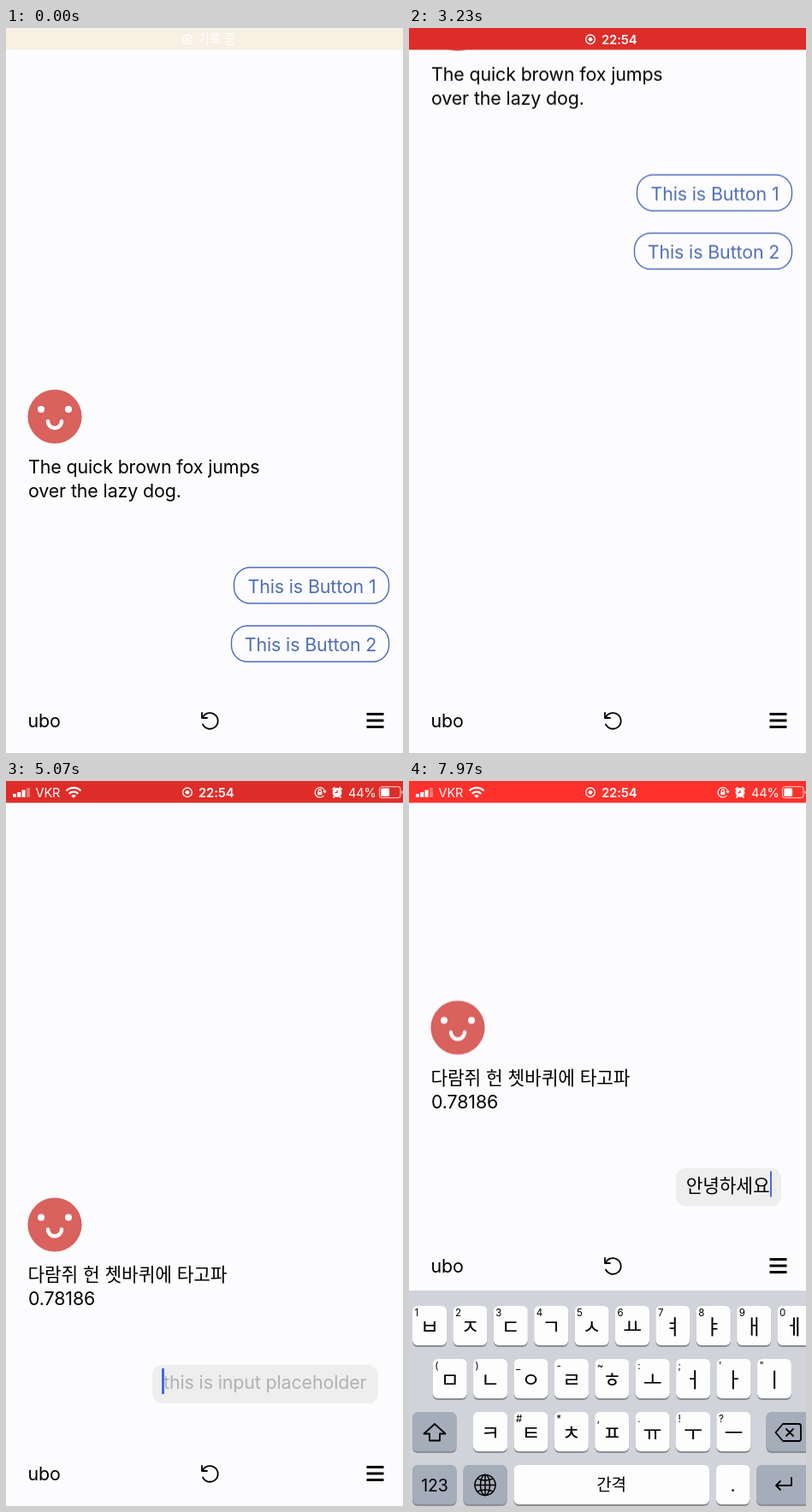
An HTML page that plays this animation: 464 px wide and 848 px high, repeating every 8 s.

```html
<!DOCTYPE html>
<html lang="ko">
<head>
<meta charset="utf-8">
<title>Chat prompt</title>
<style>
html, body { margin: 0; width: 100%; height: 100%; overflow: hidden; background: #fcfcfe; }
svg { display: block; width: 100%; height: 100%; }
svg, #field { font: 21.4px Inter, "Noto Sans CJK KR", "Noto Sans CJK", sans-serif; letter-spacing: -.12px; }
.line { fill: none; stroke: #000; stroke-linecap: round; stroke-linejoin: round; }
.mid { text-anchor: middle; }
.button rect { fill: none; stroke: #4b6cb7; stroke-width: 1.4; }
.button text { fill: #4f6eb5; text-anchor: middle; }

.old, .new, .tools, .keys, .entry, .bar, .label, .clock, .icons { animation: 8s linear infinite; }
.old { animation-name: old; }
.new { animation-name: new; }
.tools { animation-name: tools; }
.keys { animation-name: keys; }
.entry { animation-name: entry; }
.bar { animation-name: bar; }
.label { animation-name: label; animation-timing-function: step-end; }
.clock { animation-name: clock; animation-timing-function: step-end; }
.icons { animation-name: icons; }

@keyframes old {
  0% { transform: translateY(0); }
  37.4% { transform: translateY(0); animation-timing-function: ease-in-out; }
  42.9%, 100% { transform: translateY(-800px); }
}
@keyframes new {
  0% { transform: translateY(800px); }
  37.4% { transform: translateY(800px); animation-timing-function: ease-in-out; }
  42.9% { transform: translateY(0); }
  53.75% { transform: translateY(0); animation-timing-function: ease-in-out; }
  57.5% { transform: translateY(-89px); }
  64.125% { transform: translateY(-89px); animation-timing-function: cubic-bezier(.25, .7, .25, 1); }
  68.5%, 100% { transform: translateY(-319.5px); }
}
@keyframes tools {
  0% { transform: translateY(0); }
  64.125% { transform: translateY(0); animation-timing-function: cubic-bezier(.25, .7, .25, 1); }
  68.5%, 100% { transform: translateY(-243px); }
}
@keyframes keys {
  0% { transform: translateY(252px); }
  64.125% { transform: translateY(252px); animation-timing-function: cubic-bezier(.25, .7, .25, 1); }
  68.5%, 100% { transform: translateY(0); }
}
@keyframes entry { 0%, 53.75% { opacity: 0; } 57.5%, 100% { opacity: 1; } }
@keyframes bar {
  0% { fill: #f8f1e4; }
  4%, 27.875%, 50.875%, 74.125%, 97.125%, 100% { fill: #fe312c; animation-timing-function: ease-in-out; }
  16.25%, 39.375%, 62.5%, 85.625% { fill: #de2d29; animation-timing-function: ease-in-out; }
}
@keyframes label { 0% { opacity: 1; } 33.75%, 100% { opacity: 0; } }
@keyframes clock { 0% { opacity: 0; } 33.75%, 100% { opacity: 1; } }
@keyframes icons { 0%, 41.875% { opacity: 0; } 45%, 100% { opacity: 1; } }

#field {
  position: relative; float: right; box-sizing: border-box; height: 45px; padding: 0 13.5px;
  border-radius: 12px; background: #eee; color: #b1b1b4; line-height: 41px; white-space: pre;
}
#field.typed { color: #000; padding-left: 12px; }
#field::after {
  content: ""; position: absolute; left: 11.5px; top: 4px; width: 2.5px; height: 30px; background: #426be0;
}
#field.typed::after { left: auto; right: 11px; }
</style>
</head>
<body>
<svg viewBox="0 0 464 848" xmlns="http://www.w3.org/2000/svg">
  <defs>
    <g id="face">
      <circle r="31.6" fill="#d9615e"/>
      <circle cx="-16" cy="-8.5" r="4" fill="#fff"/>
      <circle cx="16" cy="-8.5" r="4" fill="#fff"/>
      <path d="M-8 5.5a8 8 0 0 0 16 0" fill="none" stroke="#fff" stroke-width="4.4" stroke-linecap="round"/>
    </g>
  </defs>

  <g class="old">
    <use href="#face" x="57" y="454.5"/>
    <text x="26" y="521">The quick brown fox jumps</text>
    <text x="26" y="549">over the lazy dog.</text>
    <g class="button"><rect x="266.5" y="631" width="181" height="42" rx="19"/><text x="357.5" y="660.5">This is Button 1</text></g>
    <g class="button"><rect x="263.5" y="699.3" width="184" height="42" rx="19"/><text x="356" y="729">This is Button 2</text></g>
  </g>

  <g class="new">
    <use href="#face" x="57" y="608"/>
    <text x="25.5" y="674">다람쥐 헌 쳇바퀴에 타고파</text>
    <text x="26" y="702">0.78186</text>
    <foreignObject class="entry" x="0" y="772" width="435" height="46"><div id="field" xmlns="http://www.w3.org/1999/xhtml"></div></foreignObject>
  </g>

  <g class="tools">
    <rect y="775" width="464" height="80" fill="#fcfcfe"/>
    <text x="25.5" y="818">ubo</text>
    <g class="line" stroke-width="1.8">
      <path d="M229.8 806.8A9.3 9.3 0 1 1 230 814.5M229 801v6h6"/>
      <path d="M421.5 802.5h20m-20 7.5h20m-20 7.5h20" stroke-width="3" stroke-linecap="butt"/>
    </g>
  </g>

  <g class="keys">
    <rect y="596" width="464" height="252" fill="#d0d3d9"/>
    <g id="keycaps"></g>
    <g class="line" stroke-width="1.8">
      <path d="M30 752l12.5 11.5h-6.5v8h-12v-8h-6.5z"/>
      <path d="M437 752h18.5q2.5 0 2.5 2.5v15q0 2.5-2.5 2.5h-18.5l-8.5-10zM441 758l8 8m0-8l-8 8"/>
      <g stroke-width="1.5">
        <circle cx="89" cy="823.5" r="12"/>
        <ellipse cx="89" cy="823.5" rx="5.5" ry="12"/>
        <path d="M89 811.5v24M77 823.5h24M80 816q9 4 18 0M80 831q9-4 18 0"/>
      </g>
      <path d="M447 815v9h-18m5-5l-5 5 5 5"/>
    </g>
  </g>

  <rect class="bar" width="464" height="25.5"/>
  <g fill="#fff" font-size="14.5">
    <circle cx="212" cy="13.3" r="5.3" fill="none" stroke="#fff" stroke-width="1.3"/>
    <circle cx="212" cy="13.3" r="2.4"/>
    <text class="label" x="224.5" y="18.3">기록 중</text>
    <text class="clock" x="225" y="18.5" font-size="14.8" font-weight="600">22:54</text>
    <g class="icons">
      <path d="M8 15h4v4h-4zM13.3 13h4v6h-4zM18.6 10.5h4v8.5h-4z"/>
      <path d="M24 8h4v11h-4z" opacity=".35"/>
      <text x="34.5" y="18.5">VKR</text>
      <path d="M70.5 11.5a12 12 0 0 1 17 0M73.8 14.8a7.5 7.5 0 0 1 10.4 0" fill="none" stroke="#fff" stroke-width="2.3"/>
      <path d="M76.3 17.2a4 4 0 0 1 5.4 0l-2.7 2.8z"/>
      <g fill="none" stroke="#fff" stroke-width="1.2">
        <path d="M371.5 17a5.8 5.8 0 1 1 1.2-4.5M370.8 12l2 1.5 1.2-2M365.2 13v-1.5a1.6 1.6 0 0 1 3.2 0v1.5"/>
        <path d="M364.3 12.8h5v3.5h-5z" fill="#fff" stroke="none"/>
        <circle cx="387" cy="13.5" r="4.8" fill="#fff"/>
        <path d="M381.5 10l3-2.5m5 0l3 2.5M384 18l-1.5 1.5m7.5-1.5l1.5 1.5" stroke-width="1.8"/>
        <path d="M387 10.5v3.2h-2.5" stroke="#ee302b"/>
        <rect x="436.5" y="6.7" width="24.5" height="13" rx="3" opacity=".65"/>
      </g>
      <text x="400" y="18.5">44%</text>
      <rect x="438.3" y="8.5" width="9.8" height="9.4" rx="1.5"/>
      <path d="M462.3 11a2.4 2.4 0 0 1 0 4.5z" opacity=".6"/>
    </g>
  </g>
</svg>
<script>
const LOOP = 8000, TYPE_START = 6430, KEY_TIME = 120;
const PITCH = 47.4;
const LIGHT = "#fdfdfe", DARK = "#a5acba";

const cap = (x, y, w, fill) =>
  `<rect x="${x}" y="${y + 1.5}" width="${w}" height="46.5" rx="6" fill="#8b8d92"/>` +
  `<rect x="${x}" y="${y}" width="${w}" height="46" rx="6" fill="${fill}"/>`;
const label = (x, y, size, text) =>
  `<text class="mid" x="${x}" y="${y}" font-size="${size}">${text}</text>`;

const letterRow = (x0, y, letters, hints) => [...letters].map((letter, i) => {
  const x = x0 + i * PITCH;
  return cap(x, y, 40, LIGHT) + label(x + 20, y + 33, 24, letter) +
    `<text x="${x + 2.5}" y="${y + 11.5}" font-size="11.5">${hints[i].trim()}</text>`;
}).join("");

document.getElementById("keycaps").innerHTML =
  letterRow(4, 614, "ㅂㅈㄷㄱㅅㅛㅕㅑㅐㅔ", "1234567890") +
  letterRow(27.7, 676, "ㅁㄴㅇㄹㅎㅗㅓㅏㅣ", "()_-~:;'\"") +
  letterRow(75, 738, "ㅋㅌㅊㅍㅠㅜㅡ", " #*,.!?") +
  cap(4, 738, 51.5, DARK) + cap(417.5, 738, 52, DARK) +
  cap(4, 800, 51.5, DARK) + cap(63.5, 800, 51, DARK) +
  cap(122.5, 800, 228.5, LIGHT) + cap(359, 800, 39.5, LIGHT) +
  cap(406, 800, 64, DARK) +
  label(30, 830.5, 19.5, "123") + label(236.5, 830, 19, "간격") + label(378.5, 831, 21, ".");

const typed = "ㅇ 아 안 안ㄴ 안녀 안녕 안녕ㅎ 안녕하 안녕핫 안녕하세 안녕하셍 안녕하세요".split(" ");
const field = document.getElementById("field");

function tick() {
  const t = performance.now() % LOOP;
  const step = Math.min(Math.floor((t - TYPE_START) / KEY_TIME), typed.length - 1);
  const text = step < 0 ? "this is input placeholder" : typed[step];
  if (field.textContent !== text) {
    field.textContent = text;
    field.classList.toggle("typed", step >= 0);
  }
  requestAnimationFrame(tick);
}
tick();
</script>
</body>
</html>
```
